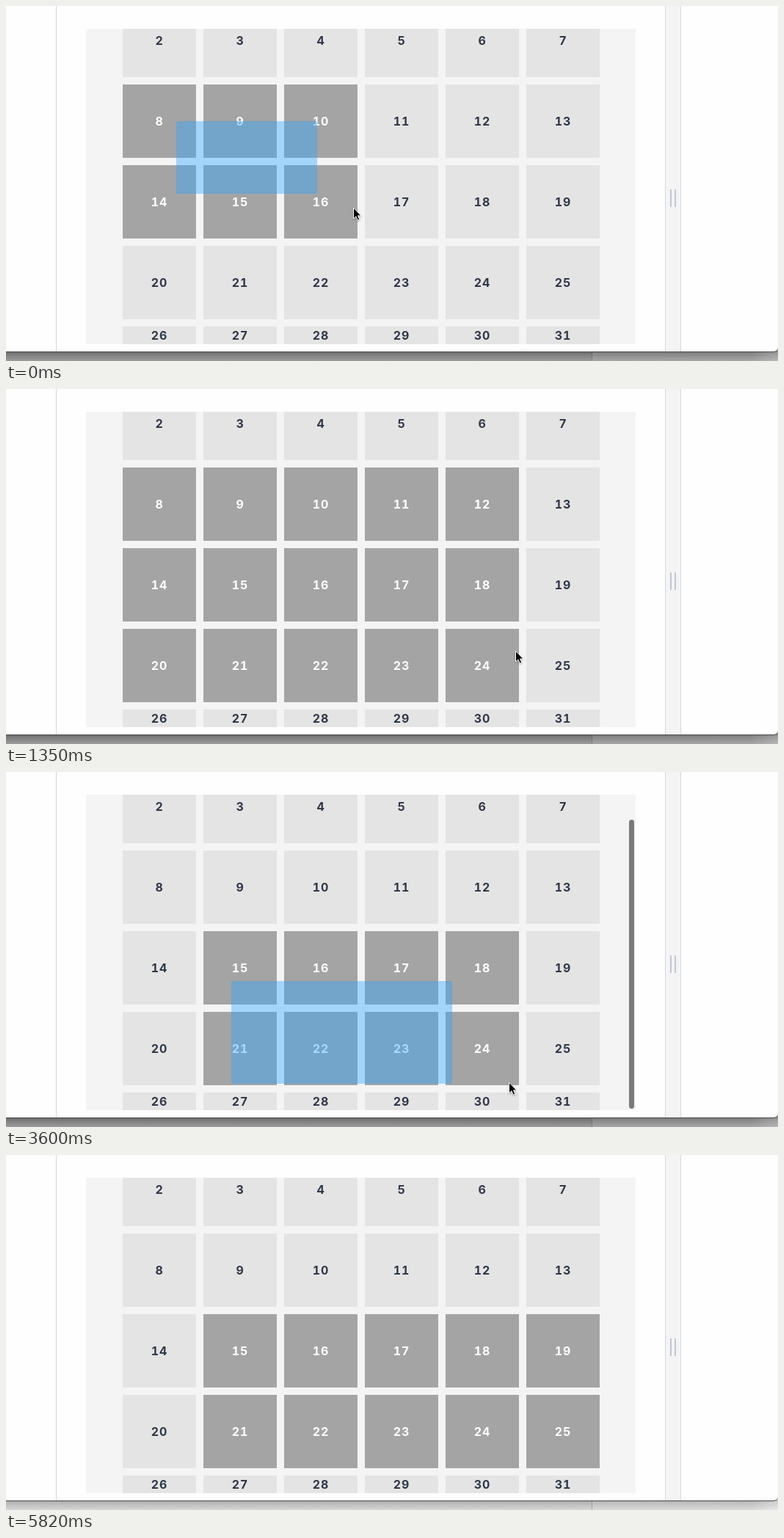
An HTML page that plays this animation: 1052x484 px, repeating every 5.92 s.

```html
<!DOCTYPE html>
<html lang="en">
<head>
<meta charset="utf-8">
<title>Drag selection</title>
<style>
  html, body { margin: 0; width: 100%; height: 100%; overflow: hidden; }
  #stage { position: relative; width: 1052px; height: 484px; overflow: hidden; background: #999; }
  #stage div, #cursor { position: absolute; box-sizing: border-box; }

  #shade { left: 0; top: 460px; width: 1052px; height: 24px;
    background: linear-gradient(90deg, #fff0 1015px, #fff3 1052px),
      linear-gradient(#686868 11px, #7c7c7c 15px, #9c9c9c 24px); }
  #shade.idle { background: linear-gradient(90deg, #fff0 1015px, #fff5 1052px),
      linear-gradient(#a8a8a8 11px, #bababa 15px, #d6d6d6 24px); }
  #seam { left: 798px; top: 472px; width: 254px; height: 12px;
    background: #ffffff1a; border-left: 1px solid #0003; }
  #window { left: 0; top: -10px; width: 1052px; height: 482px; background: #fefefe;
    border-bottom: 1px solid #4c4c4c; border-bottom-right-radius: 6px; }
  #edge { left: 68px; top: 0; width: 1px; height: 471px; background: #d3d5de; }
  #gutter { left: 898px; top: 0; width: 22px; height: 471px; background: #f4f4f5;
    border: solid #d6d8e0; border-width: 0 1px; }
  #grip { left: 905px; top: 250px; width: 8px; height: 24px;
    border: solid #bfc8d2; border-width: 0 2px; }

  #panel { left: 109px; top: 31px; width: 749px; height: 430px; overflow: hidden; background: #f4f4f4; }
  #grid { left: 50px; top: 0; width: 650px; height: 464px; }
  #grid div { width: 100px; display: flex; align-items: center; justify-content: center;
    background: #e4e4e4; color: #2d3748;
    font: 700 16px Inter, sans-serif; font-variant-numeric: tabular-nums; letter-spacing: .05em; }
  #grid .on { background: #a4a4a4; color: #fff; }
  #thumb { left: 849px; top: 33px; width: 7px; height: 394px; border-radius: 4px; background: #7a7a7a; }
  #marquee { background: rgba(41, 164, 255, .4); border-radius: 2px; }
  #cursor { left: 0; top: 0; overflow: visible; filter: drop-shadow(0 1px 1px #0005); }
</style>
</head>
<body>
<div id="stage">
  <div id="shade"></div>
  <div id="seam"></div>
  <div id="window"></div>
  <div id="edge"></div>
  <div id="gutter"></div>
  <div id="grip"></div>
  <div id="panel"><div id="grid"></div></div>
  <div id="thumb"></div>
  <div id="marquee"></div>
  <svg id="cursor" width="14" height="20">
    <path d="M.5 1.1V16L3.9 12.8L6.3 18.2L8.8 17.1L6.5 11.9H11Z" fill="#000" stroke="#fff"/>
  </svg>
</div>
<script>
const LOOP = 5920, STEP = 145.7, PITCH = 110, SCROLL_MAX = 34;
const $ = id => document.getElementById(id);
const clamp = v => Math.min(1, Math.max(0, v));

const drags = [
  { x: 232, y: 157, start: 180, end: 1350 },
  { x: 307, y: 285, start: 3150, end: 4340 }
];

// Pointer waypoints: time, x, y and the ease-out power of the move there
const path = [
  [-111, 424, 256], [34, 473, 274], [763, 693, 320, 1.6], [909, 693, 326], [1054, 694, 356],
  [1600, 694, 356], [1637, 690, 352],
  [2450, 690, 352], [2950, 307, 285, 2], [3004, 334, 291], [3150, 463, 379],
  [3441, 608, 425], [3587, 685, 422], [4100, 745, 426, 2],
  [4330, 745, 426], [4461, 884, 448]
];

function pointer(t) {
  const i = path.findIndex(p => p[0] > t);
  if (i < 1) return path.at(i).slice(1, 3);
  const [t0, x0, y0] = path[i - 1], [t1, x1, y1, power = 1] = path[i];
  const k = 1 - (1 - (t - t0) / (t1 - t0)) ** power;
  return [x0 + (x1 - x0) * k, y0 + (y1 - y0) * k].map(Math.round);
}

// Movement advances in even steps, counted from the start of each drag
function snap(t) {
  const { start } = drags[t < drags[1].start ? 0 : 1];
  return start + Math.max(-1, Math.floor((t - start) / STEP)) * STEP;
}

// The box trails the pointer by one step
function box(drag, t) {
  const [right, bottom] = pointer(snap(Math.min(t, drag.end)) - STEP);
  return { x: drag.x, y: drag.y, right, bottom };
}

const cells = Array.from({ length: 30 }, (_, i) => {
  const el = document.createElement('div');
  const x = i % 6 * PITCH, y = Math.floor(i / 6) * PITCH, h = i < 24 ? 100 : 24;
  el.textContent = i + 2;
  el.style.cssText = `left:${x}px;top:${y}px;height:${h}px`;
  $('grid').append(el);
  return { el, x: x + 159, y: y + 31 - SCROLL_MAX, h };
});

function draw(t) {
  const [px, py] = pointer(snap(t));
  $('cursor').style.transform = `translate(${px}px, ${py}px)`;
  $('cursor').style.display = t < 4630 ? 'block' : 'none';

  const scrolled = t < 1940 ? 1 : clamp((snap(t) - 2080) / 290);
  $('grid').style.top = -Math.round(scrolled * SCROLL_MAX) + 'px';
  $('thumb').style.transform = `translateY(${Math.round(scrolled * 32)}px)`;
  $('thumb').style.opacity = t < 1940 || t >= 5380 ? 0 : t < 5230 ? 1 : .5;

  const [first, second] = drags;
  const drag = t < second.start ? first : second;
  const b = box(drag, t);
  Object.assign($('marquee').style, {
    display: t < drag.end ? 'block' : 'none',
    left: b.x + 'px', top: b.y + 'px',
    width: b.right - b.x + 'px', height: b.bottom - b.y + 'px'
  });

  // A new selection starts once the box is more than a sliver
  const s = b.bottom - b.y > 10 ? b : box(first, t);
  for (const c of cells)
    c.el.classList.toggle('on', c.x < s.right && c.x + 100 > s.x && c.y < s.bottom && c.y + c.h > s.y);

  $('shade').classList.toggle('idle', t >= 5820);
}

const start = performance.now();
function tick() {
  draw((performance.now() - start) % LOOP);
  requestAnimationFrame(tick);
}
tick();
</script>
</body>
</html>
```
